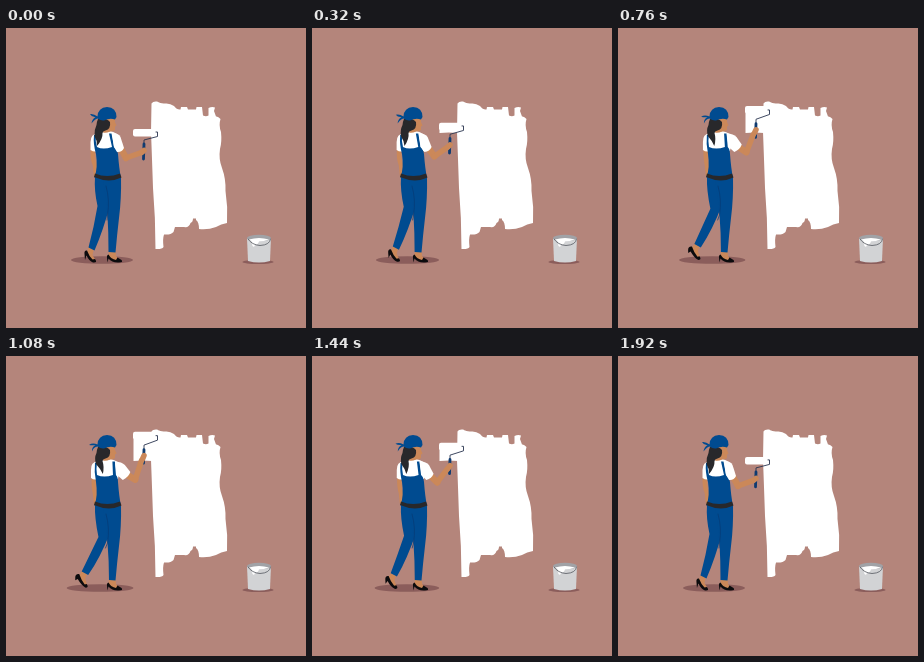
Write an HTML page that moves like this. It is 300x300 px and loops after 1960 ms.

```html
<!DOCTYPE html>
<html lang="en">
<head>
<meta charset="utf-8">
<title>Painting a wall</title>
<style>
html, body { margin: 0; width: 100%; height: 100%; overflow: hidden; background: #b4857b }
svg { display: block; width: 100vw; height: 100vh }
.blue { fill: #004b90 }
.dark { fill: #28282b }
.shoe { fill: #0c0b0d }
.skin { fill: #cb8859 }
.white { fill: #fff }
.shade { fill: #8b5d5b }
.line, .limb { fill: none; stroke-linecap: round; stroke-linejoin: round }
.limb { stroke: #cb8859 }
</style>
</head>
<body>
<!-- In data-d, "a~b" is a coordinate that moves from a (roller low) to b (roller high). -->
<svg viewBox="0 0 300 300">
  <!-- wall paint -->
  <path class="white" d="M145.5 75.5Q147 73 151 73.5Q155 76 159 75.5Q164 75 168 78Q171 82 174.5 81.5L175 79H181L182 81.5H190L190.5 79H196L197 87.5Q200 89 202.5 87.5V80Q206 78.5 209 79.5L208 83L210 88.5Q212 88 214.5 91Q212.500 97 215 104Q216 114 214 121Q212.500 131 216 140Q220 151 219.500 163Q222 179 221 195Q215 196 210 199Q202 202 193 201Q193 194 190 192V190.500H187Q187 194 184.500 195Q183 200 178 199H169L167.500 204Q165 207 158 206.500Q156.500 211 157.500 219Q156 221.500 149.500 221Q149.500 190 147 160Q146 130 145 104Z"/>
  <path class="white" data-d="M127.500 103~78L127.500 105Q137 104 146 105V102~76Z"/>

  <!-- bucket -->
  <ellipse class="shade" cx="252" cy="234" rx="15.500" ry="2"/>
  <path fill="#d2d3d5" d="M241 210L242 233Q253 236 264 233L265 210Z"/>
  <ellipse cx="253" cy="210" rx="12" ry="3.300" fill="#a1a2a6"/>
  <path class="white" d="M243 211.500Q253 208.500 263 211.500Q258 213.500 253 213.500Q252 217 249 216.500Q248.500 220 246.500 218L245.500 213Z"/>
  <path class="line" stroke="#555860" stroke-width=".8" d="M242 211Q246 217 254 217.500Q264 217 264.500 211"/>

  <!-- legs and shoes -->
  <ellipse class="shade" data-cx="96~94" cy="232" data-rx="31~33.500" ry="3.800"/>
  <path class="skin" data-d="M83~76 218~214L88~81 220~217L86.500~79 227~222.500L90~81 233~230L85~76.500 231~227L81~73 224~220Z"/>
  <path class="shoe" data-d="M81~73 222.500~218Q78~69 222~217.500 78.500~69 226~221.500L79~69 232~224L80.500~71.500 227.500~223Q83~75 233~229 87~79 234.500~231.500Q92~83 235~232 89~80.500 231~228L86.500~78.500 231.500~228.500Q83~75 228~224 81~73 222.500~218Z"/>
  <path class="skin" d="M103 222H109.500L110 228L114 232.500H105L102.500 228Z"/>
  <path class="shoe" d="M102.500 226.500Q100.500 227 101 230L101.500 234.500L102.500 230.500Q106 235 113 234.500Q117.500 234.500 115.500 232L111.500 229.500L110 232Q105 231 102.500 226.500Z"/>
  <path class="blue" data-d="M89 149Q88~88.500 162 91.500~92.500 178~181Q88~83 199~200 82.500~75.500 219.500~215.500L88.500~82 222.500~219Q97~94 203~202 104 177L105 149Z"/>
  <path class="blue" data-d="M97 150L115 149Q115.500 171 113 190Q111 207 109.500 224.500L102.500~103 224Q102.500~103 204 101.500 187L99 164Z"/>
  <path class="line" stroke="#063a74" stroke-width=".7" data-d="M100 158Q104 172 101.500 187L101~99.500 192"/>

  <!-- far arm, torso -->
  <path class="limb" stroke-width="4.500" data-d="M87~88 120Q86~87.500 130 89 137L90 147"/>
  <path class="white" data-d="M92 105Q84.500 106 84.500~85 114V122Q88 124.500 92 123L112 123L113~115 108Q108 103 102 103Z"/>
  <path class="skin" d="M97 99H105L104 103.500Q100 105.500 97 104.500Z"/>
  <path class="blue" data-d="M88~89 107L90~91 106.500Q89~90 113 91 119Q97~98 122 106~107 119L103~106.500 105.500L105.500~109 105.500Q107~109.500 113 108~110 119Q111~112 121 112 126Q113 140 115 150L88.500 150Q92 139 90 126Q87~88 116 88~89 107Z"/>
  <path class="dark" d="M89 145.500Q101 150.500 114 145.500L115.500 149.500Q103 155.500 88 149Z"/>

  <!-- head -->
  <path class="skin" d="M98 90H109L109 94L110.500 97.500L109 98.500L109 102Q106 104.500 99 103Z"/>
  <path class="dark" data-d="M92 91Q100 89 104 94Q105 101 99.500 102.500Q97 102.500 96.500 105Q97~98.500 111 91~97 118Q91~94 112 88.500~90 108Q88 102 90.500 97Q91 93 92 91Z"/>
  <path class="blue" data-d="M91.500 88.500Q92 79.500 101 79Q110.500 79.500 110.500 89L109 91.500Q104 89.500 98 92.500Q95 93 91.500 90.500Q89~87.500 91 85.500~86 95.500Q86~85.500 91 89.500 89Q86 89.500 84~83 86~89Q88~86.500 85.500~86.500 91.500 88.500Z"/>

  <!-- roller -->
  <rect class="white" x="127" data-y="101~75" width="24.500" height="7.500" rx="2"/>
  <path class="line" stroke="#2a3550" stroke-width=".9" data-d="M150 104~79H151.500V108.500~83.500L138 112~88.500V115~92"/>
  <path class="line" stroke="#0f3b70" stroke-width="2.800" data-d="M138 116~93L137.500 131~106.500"/>

  <!-- near arm -->
  <path class="limb" stroke-width="6.500" data-d="M113~118 117L120~129.500 130~123.500"/>
  <path class="limb" stroke-width="5.500" data-d="M120~129.500 130~123.500L134~135.500 125~104"/>
  <path class="limb" stroke-width="5.500" data-d="M135.500~136.500 124.500~102.500L138 122.500~99"/>
  <path class="white" data-d="M106~109 105.500Q112~116 104.500~106 114.500~119 109L118~124.500 120~116Q116~123 124.500~121 111~117 124L108~111 119Z"/>
</svg>
<script>
const LOOP = 1960;
const moving = [];
for (const el of document.querySelectorAll('svg *')) {
  for (const [key, text] of Object.entries(el.dataset)) moving.push({ el, key, text });
}

const blend = (text, p) =>
  text.replace(/([\d.]+)~([\d.]+)/g, (_, a, b) => (+a + (b - a) * p).toFixed(2));

function draw(now) {
  const p = (1 - Math.cos(2 * Math.PI * now / LOOP)) / 2;
  for (const { el, key, text } of moving) el.setAttribute(key, blend(text, p));
}

const start = performance.now();
function tick() {
  draw((performance.now() - start) % LOOP);
  requestAnimationFrame(tick);
}
tick();
</script>
</body>
</html>
```
